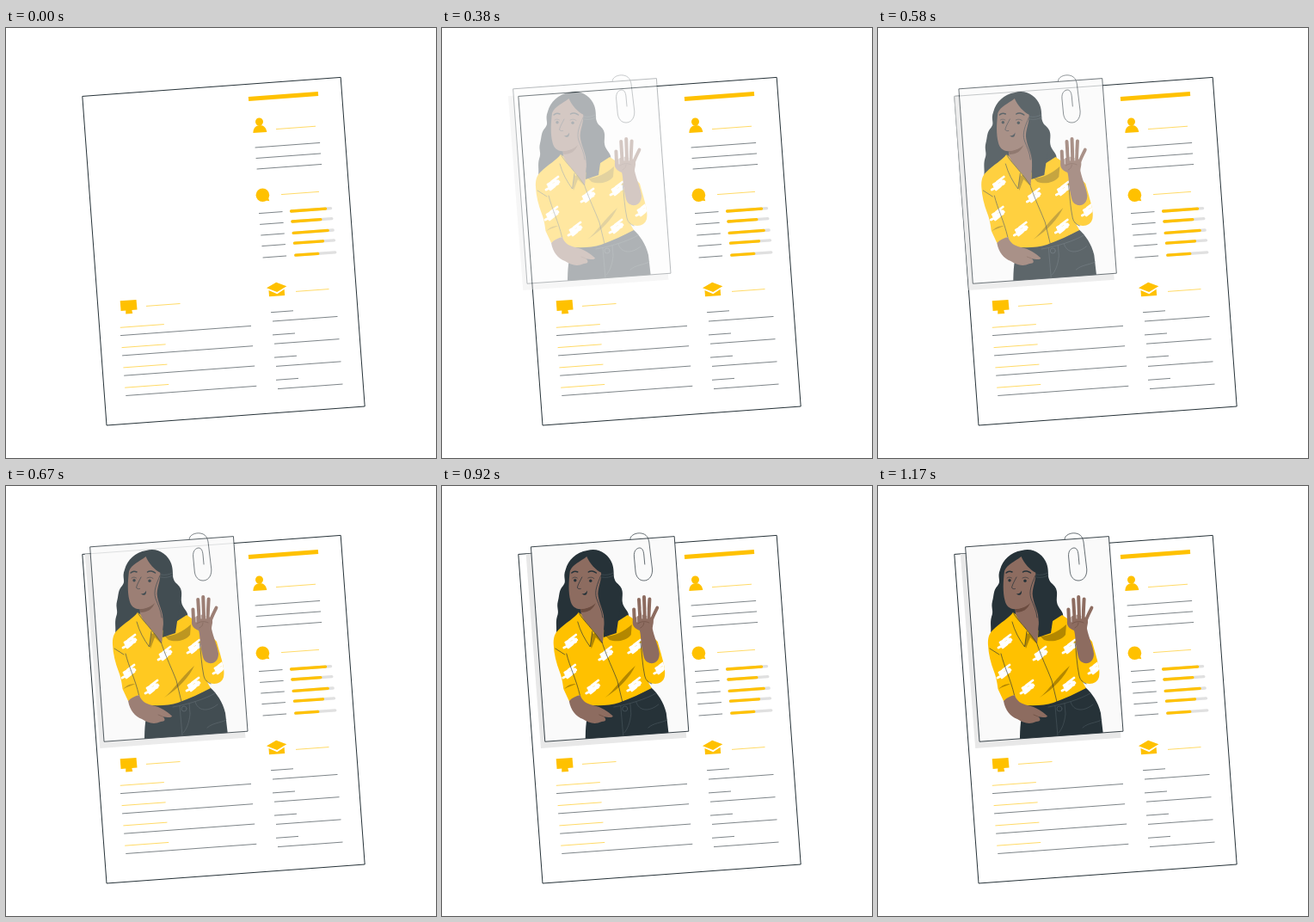
An HTML page with a canvas for the animation above (1210 ms loop, 500x500 px).

```html
<!DOCTYPE html>
<html lang="en">
<head>
<meta charset="utf-8">
<title>Resume photo</title>
<style>
html, body { margin: 0; width: 100%; height: 100%; overflow: hidden; background: #fff; }
canvas { display: block; width: 500px; height: 500px; }
</style>
</head>
<body>
<canvas id="stage"></canvas>
<script>
const SIZE = 500, LOOP = 1210, FPS = 24, LAST = 28, FIRST = 3, SLIDE = 30;
const INK = '#263238', YELLOW = '#ffc100', SKIN = '#8d6c60', FOLD = '#b38700',
      SKIN_SHADE = '#6b4c40', SEAM = '#4c5a61', TRACK = '#e0e0e0';
const ratio = window.devicePixelRatio || 1;

function setup(canvas) {
  canvas.width = canvas.height = SIZE * ratio;
  return canvas.getContext('2d');
}
const stage = document.getElementById('stage');
const layer = document.createElement('canvas');
const main = setup(stage), photo = setup(layer);

function fill(c, d, color) {
  c.fillStyle = color;
  c.fill(new Path2D(d));
}
function stroke(c, d, color = INK, width = 0.7, cap = 'round') {
  c.strokeStyle = color;
  c.lineWidth = width;
  c.lineCap = cap;
  c.lineJoin = 'round';
  c.stroke(new Path2D(d));
}
function dot(c, x, y, r, color) {
  c.fillStyle = color;
  c.beginPath();
  c.arc(x, y, r, 0, Math.PI * 2);
  c.fill();
}
// A text rule on the tilted page
function rule(x, y, len, color = INK, width = 0.6) {
  stroke(main, `M${x} ${y}l${len} ${-len * 0.0735}`, color, width, 'butt');
}

function drawPage() {
  const c = main;
  const sheet = 'M89.2 79.4L389.2 57.4L417.2 440L117.4 462Z';
  fill(c, sheet, '#fff');
  stroke(c, sheet, INK, 1);

  rule(282, 82.4, 81, YELLOW, 5);

  // Profile
  dot(c, 294.5, 109, 4.5, YELLOW);
  fill(c, 'M287.4 122C287.4 116.5 290.5 113.2 295 113C299.5 112.8 302.6 116 303.3 121Z', YELLOW);
  rule(314, 117.6, 46, YELLOW);
  for (let i = 0; i < 3; i++) rule(289.6 + i, 139 + i * 12.5, 75.5);

  // Skills
  dot(c, 298.4, 194.2, 7.8, YELLOW);
  fill(c, 'M299 200L306.3 201.3L304.6 196Z', YELLOW);
  rule(320, 193.6, 44, YELLOW);
  [[215.6, 213, 40], [228.4, 225, 33], [241, 238.4, 40], [253.6, 250.2, 33], [267, 264.2, 26]]
    .forEach(([y, bar, len], i) => {
      const x = 331.6 + i * 1.3;
      rule(294 + i * 1.15, y, 27.5);
      stroke(c, `M${x} ${bar}l46 -3.4`, TRACK, 3.3);
      stroke(c, `M${x} ${bar}l${len} ${-len * 0.0735}`, YELLOW, 3.3);
    });

  // Education
  fill(c, 'M303 302.3L314.2 295.8L326.3 300.3L315.2 307Z', YELLOW);
  fill(c, 'M305.5 305L315.3 309.2L323.6 303.8L324.2 310.9L306 312.2Z', YELLOW);
  rule(337, 306.4, 38.5, YELLOW);
  for (let i = 0; i < 4; i++) {
    rule(308 + i * 2, 330.7 + i * 26.2, 26);
    rule(310 + i * 2, 341 + i * 26.2, 75.5);
  }

  // Work
  fill(c, 'M132.7 317.3L151.5 315.9L152.5 327.6L133.6 329Z', YELLOW);
  fill(c, 'M139.3 328L146.3 327.5L147.2 331.9L139.2 332.5Z', YELLOW);
  rule(163, 323.4, 39.5, YELLOW);
  for (let i = 0; i < 4; i++) {
    rule(132.8 + i * 1.8, 348.3 + i * 23.3, 51, YELLOW);
    rule(133 + i * 2.1, 357.6 + i * 23.3, 152);
  }
}

const frame = 'M102 70.8L268.4 58.6L285 285.2L118.4 297.2Z';
const shirt = 'M157 147C152 154 143 158 133 168C129 172 127.500 177 128 185C128.500 195 131 206 135 216' +
  'C138 224 138.500 229 139.500 236L146 250L158.500 243C160 247 160.500 250 161 254C176 256 192 256 204 252' +
  'C218 247 230 241 242 235L238 228C246 232 255 230 257 222C259 214 255 203 249 181L229 160L214 150L186 168Z';

function splash(x, y) {
  stroke(photo, `M${x - 2} ${y - 2}l8 -6M${x - 6} ${y + 1}l7 -4l5 0M${x - 5} ${y + 3}l12 -5` +
    `M${x - 8} ${y + 7}l14 -7M${x - 3} ${y + 7}l5 -4`, '#fff', 2.8);
}

function drawBack() {
  const c = photo;
  fill(c, 'M167 75C180 71 192 79 196 90C200 101 195 107 203 114C211 121 207 128 208 135' +
    'C209 143 217 145 215 154C214 159 217 161 219 164C210 170 203 176 188 176L175 165L155 153' +
    'C146 158 138 163 131 172C132 164 130 159 132 152C135 145 131 142 133 134C135 127 134 121 139 116' +
    'C144 110 138 107 142 97C145 86 154 77 167 75Z', INK);
}

function drawTrousers() {
  const c = photo;
  fill(c, 'M162 252C190 256 220 248 241 234C249 241 256 251 259 264L262 290L165 297C165 281 166 268 170 258Z', INK);
  stroke(c, 'M198 257C215 254 235 248 247 241M206 256L209 291M217 253L218 265C217 275 214 283 210 287' +
    'M224 251C227 262 239 263 250 254M238 281C245 275 252 276 260 272', SEAM, 0.6);
  stroke(c, 'M214 259A3 3 0 1 1 208 259A3 3 0 1 1 214 259', SEAM, 0.7);
}

function drawShirt() {
  const c = photo;
  fill(c, shirt, YELLOW);
  c.save();
  c.clip(new Path2D(shirt));
  [[148, 181], [189, 195], [147, 216], [174, 234], [222, 231], [223, 187], [253, 211]]
    .forEach(([x, y]) => splash(x, y));
  fill(c, 'M188 174C194 176 208 171 219 161L218 173C213 180 201 182 193 179Z', FOLD);
  c.restore();
  fill(c, 'M188 246C199 237 207 223 223 209C217 222 205 235 188 246Z', FOLD);
  fill(c, 'M158 148C160 158 166 167 172 189L177 176L185 184L186 166L174 172Z', FOLD);
  fill(c, 'M140.500 236C144 232 148 230 154 230C149 233 145 233 140.500 236Z', FOLD);
  stroke(c, 'M130 189L141 196M143 195C147 211 154 224 158.500 243M185 184C190 199 197 213 202 226L208 251', INK, 0.65);
  stroke(c, 'M229 181C231 196 231 207 234 221C235 226 239 229 242 230', INK, 0.65);
}

function drawHead() {
  const c = photo;
  // Neck, then face
  fill(c, 'M159 137L160 149C165 161 175 166 185 183L187 161L185 124L172 130Z', SKIN);
  fill(c, 'M159.500 143C167 143 173 140 177 136C174 143 169 147 160.500 147Z', SKIN_SHADE);
  fill(c, 'M166.500 82C159 88 150 91 147 99C145.500 111 145 123 147.500 133C149 140 154 144 161 143' +
    'C168 142 174 139 178 133L185 126L184 101C177 98 170 90 166.500 82Z', SKIN);
  fill(c, 'M183 98C185 110 178 119 180 129C182 140 187 147 187 158L186 176L201 171L207 130L195 100Z', INK);
  stroke(c, 'M183 104C179 114 175 122 178 131C181 139 184 144 185 153', INK, 0.7);
  stroke(c, 'M184 103C189 104 194 103 197 101M184 106C190 107 194 106 198 104', SEAM, 0.5);
  // Collar
  fill(c, 'M157 146.500C162 156 169 162 173 169L170.500 187C163 176 157 163 155.500 152Z', YELLOW);
  stroke(c, 'M157 147C162 156 170 162 185 183M173 169L170.500 187C164 178 159 169 156 158', INK, 0.65);
  // Features
  stroke(c, 'M149 101C151 99 154 99 156 100M168.500 100C171 98 175 99 177.500 101', INK, 1.5);
  stroke(c, 'M150 107C152 105.500 154 106 155.500 107M168 107C171 105.500 173 106 175 107.500', INK, 0.6);
  dot(c, 153, 109.700, 1.7, INK);
  dot(c, 171, 110.300, 1.7, INK);
  stroke(c, 'M161 106C159 110 156.500 114 155.500 118C156 119.500 158 120 159.500 119.500', INK, 0.7);
  fill(c, 'M160.500 125C163.500 126 166 124 167 121.500C167.500 126 165 129 160.500 125Z', INK);
}

function drawArms() {
  const c = photo;
  // Lower hand
  fill(c, 'M146 250C150 246 154 244 159 243C161 250 166 253 174 255C184 257 191 262 197 267.500' +
    'C196 270 191 269 186 268C190 271 189 274 184 274C175 278 169 275 162 271C154 268 148 261 146 250Z', SKIN);
  stroke(c, 'M186 268L181 266', SKIN_SHADE, 0.7);
  // Raised hand
  fill(c, 'M220 157C223 152 228 149 233 150L242 153C246 157 243 161 243 166C245 176 250 186 251 195' +
    'C251 203 246 207 240 206C233 204 233 199 231 190C229 181 230 175 228 168C223 166 219 163 220 157Z', SKIN);
  stroke(c, 'M222 157L221.400 143.500M228.500 153L227.200 132M234 153L233.200 129M238.500 154L239.600 131.500', SKIN, 4);
  stroke(c, 'M241 159C243 152 246 147 248.500 141.500', SKIN, 3.8);
  stroke(c, 'M225 158L224.700 148M231 154L230.400 143M236.500 154L236.500 144', '#fafafa', 0.7);
  stroke(c, 'M226 160C230 157 235 157 239 159M233 159C233 162 231 164 229 165', SKIN_SHADE, 0.6);
}

function drawPhoto(dx) {
  const c = photo;
  c.setTransform(1, 0, 0, 1, 0, 0);
  c.clearRect(0, 0, layer.width, layer.height);
  c.setTransform(ratio, 0, 0, ratio, dx * ratio, 0);
  fill(c, 'M95.800 79L262 66.800L282.500 292.800L113.200 305Z', '#e8e8e8');
  fill(c, frame, '#fafafa');
  c.save();
  c.clip(new Path2D(frame));
  drawBack();
  drawTrousers();
  drawShirt();
  drawHead();
  drawArms();
  c.restore();
  stroke(c, frame, INK, 0.9);
  stroke(c, 'M217 62C217 57 224 54 230 55C236 56 238 60 239 65L242.800 97C243 106 238 110 233 110' +
    'C227 110 224 105 223.300 100L221.600 82C221 75 225 72 228 72C231 72 232.500 75 233 80L234 91', INK, 0.7);
}

const bez = (s, a, b) => 3 * (1 - s) ** 2 * s * a + 3 * (1 - s) * s * s * b + s ** 3;
function ease(x) {
  let lo = 0, hi = 1;
  for (let i = 0; i < 30; i++) {
    const mid = (lo + hi) / 2;
    if (bez(mid, 0.36, 0.5) < x) lo = mid; else hi = mid;
  }
  return bez((lo + hi) / 2, -0.01, 1.38);
}

// Steps run at 24 per second, rounded to hundredths of a second
function stepAt(ms) {
  let n = 0;
  while (n < LAST && Math.round((n + 1) * 100 / FPS) * 10 <= ms) n++;
  return n;
}

let start, shown = -1;
function tick(now) {
  start ??= now;
  const n = stepAt((now - start) % LOOP);
  if (n !== shown) {
    shown = n;
    main.setTransform(ratio, 0, 0, ratio, 0, 0);
    main.fillStyle = '#fff';
    main.fillRect(0, 0, SIZE, SIZE);
    drawPage();
    if (n >= FIRST) {
      const p = ease(n / LAST);
      drawPhoto(SLIDE * (p - 1));
      main.globalAlpha = Math.min(1, Math.max(0, p));
      main.drawImage(layer, 0, 0, SIZE, SIZE);
      main.globalAlpha = 1;
    }
  }
  requestAnimationFrame(tick);
}
requestAnimationFrame(tick);
</script>
</body>
</html>
```
